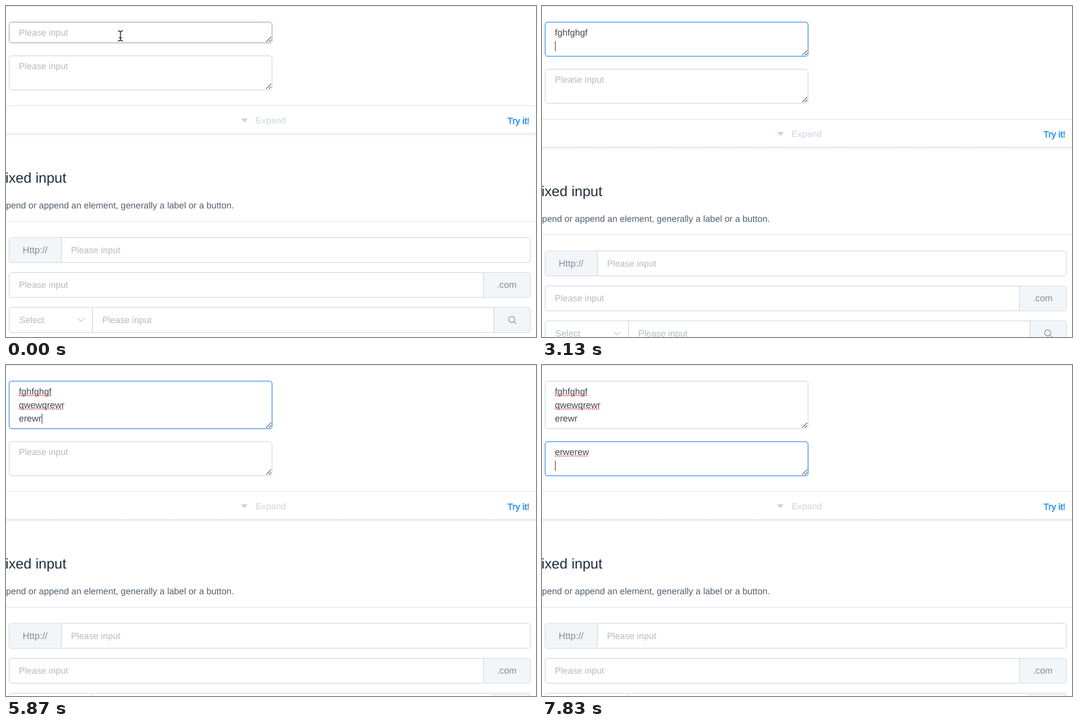
Animation, 947 px wide and 592 px high, one loop 8 s. Source, as an HTML page:

```html
<!DOCTYPE html>
<html lang="en">
<head>
<meta charset="utf-8">
<title>Autosize textarea</title>
<style>
  html, body { margin: 0; width: 100%; height: 100%; overflow: hidden; background: #fff; }
  svg { display: block; }
  text { font: 16px "Liberation Sans", Arial, sans-serif; white-space: pre; text-rendering: geometricPrecision; }
  .hint { fill: #b6bac2; }
  .typed { fill: #45484f; font-size: 16.15px; }
  .addon { fill: #868c94; }
  .field { fill: #fff; stroke: #d2d8e2; stroke-width: 1.25; }
  .fill { fill: #f3f6f8; }
  .rule { stroke: #e3e8f0; stroke-width: 1.25; }
  .thin { fill: none; stroke-width: 1.2; }
  .grip { fill: none; stroke: #4a4c52; stroke-width: 1.1; }
  .spell { stroke: #e5483e; stroke-width: 2.2; stroke-linecap: round; stroke-dasharray: 0 3.5; }
</style>
</head>
<body>
<svg id="stage" width="947" height="592" viewBox="0 0 947 592">
  <defs>
    <linearGradient id="shade" x1="0" y1="0" x2="0" y2="1">
      <stop offset="0" stop-color="#e3eaf4" stop-opacity=".8"/>
      <stop offset="1" stop-color="#eef3fa" stop-opacity="0"/>
    </linearGradient>
    <path id="beam" d="M-4 -9Q0 -9 0 -6V6Q0 9 -4 9M4 -9Q0 -9 0 -6M0 6Q0 9 4 9M-2.2 3.2H2.2"/>
  </defs>
  <path class="rule" d="M0 .5H947"/>

  <g id="below">
    <path class="rule" d="M0 178.4H947"/>
    <rect y="228.5" width="947" height="6" fill="url(#shade)"/>
    <path class="rule" d="M0 228.3H947" style="stroke:#dde3ec"/>
    <path d="M420 201.2H432L426 208.2Z" fill="#c6d3e3"/>
    <text x="446" y="209.7" fill="#cdd6e0">Expand</text>
    <text x="935.3" y="210.7" text-anchor="end" fill="#2f8fee" stroke="#2f8fee" stroke-width=".6">Try it!</text>
    <text x="-1" y="315.6" fill="#1f2f3d" style="font-size:25.4px">ixed input</text>
    <text x="0" y="362" fill="#50606f" style="font-size:16.05px">pend or append an element, generally a label or a button.</text>
    <path class="rule" d="M0 385.4H947"/>

    <g transform="translate(0 414)">
      <rect class="field" x="5.6" y="0" width="931.2" height="44.6" rx="4.5"/>
      <path class="fill" d="M99 .6H10a4 4 0 0 0 -3.8 4V40a4 4 0 0 0 3.8 4H99Z"/>
      <path class="field" d="M99 0V44.6"/>
      <text class="addon" x="52" y="27.9" text-anchor="middle" style="font-size:16.6px">Http://</text>
      <text class="hint" x="116.2" y="27.9">Please input</text>
    </g>
    <g transform="translate(0 476.6)">
      <rect class="field" x="5.6" y="0" width="931.2" height="44.6" rx="4.5"/>
      <path class="fill" d="M853.5 .6H932a4 4 0 0 1 4.2 4V40a4 4 0 0 1 -4.2 4H853.5Z"/>
      <path class="field" d="M853.5 0V44.6"/>
      <text class="hint" x="23" y="27.9">Please input</text>
      <text class="addon" x="877" y="27.9" style="font-size:16.3px">.com</text>
    </g>
    <g transform="translate(0 539.2)">
      <rect class="field" x="5.6" y="0" width="931.2" height="44.6" rx="4.5"/>
      <path class="fill" d="M871.8 .6H932a4 4 0 0 1 4.2 4V40a4 4 0 0 1 -4.2 4H871.8Z"/>
      <path class="field" d="M154.6 0V44.6M871.8 0V44.6"/>
      <text class="hint" x="24" y="27.9">Select</text>
      <path class="thin" stroke="#b9c4d2" d="M128.2 19.4L134.2 25.2L140.2 19.4"/>
      <text class="hint" x="172" y="27.9">Please input</text>
      <g class="thin" stroke="#868c94">
        <circle cx="903.6" cy="21.4" r="5.5"/>
        <path d="M907.6 25.4L911.6 29.4"/>
      </g>
    </g>
  </g>

  <g id="areas"></g>

  <g id="pointer" fill="none" stroke-linecap="round">
    <use href="#beam" stroke="#fff" stroke-width="3.2"/>
    <use href="#beam" stroke="#222" stroke-width="1.5"/>
  </g>
</svg>
<script>
const LOOP = 8000, ROW = 24, TOP = 28.9, GAP = 23.1, PAD = 13, TEXT_X = 23;
const BASE = [210, 216, 226], HOVER = [163, 168, 176], FOCUS = [51, 136, 230];
const ONE = "fghfghgf\nqwewqrewr\nerewr", TWO = "erwerew\n";

// [time, number of characters typed]
const KEYS_ONE = [[970, 0], [1870, 1], [2030, 2], [2130, 3], [2270, 4], [2370, 5], [2470, 6],
  [2630, 7], [2670, 8], [3100, 9], [3770, 10], [4100, 11], [4270, 12], [4330, 13], [4400, 14],
  [4570, 16], [4670, 18], [4970, 19], [5570, 20], [5730, 23], [5870, 24]];
const KEYS_TWO = [[6870, 0], [7070, 1], [7200, 2], [7370, 3], [7430, 4], [7500, 6], [7670, 7], [7770, 8]];

// [time, x, y]
const PATH = [[6270, 204, 50], [6340, 192, 31], [6430, 162, 66], [6530, 127, 125],
  [6630, 111.5, 151.5], [6760, 104, 158], [6870, 102, 160]];

const $ = id => document.getElementById(id);

function set(el, attrs) {
  for (const k in attrs) el.setAttribute(k, attrs[k]);
  return el;
}

function add(parent, tag, attrs) {
  const el = document.createElementNS("http://www.w3.org/2000/svg", tag);
  return parent.appendChild(set(el, attrs));
}

const show = (el, on) => { el.style.display = on ? "" : "none"; };

function makeArea(lineCount) {
  const g = add($("areas"), "g", {});
  const box = add(g, "rect", { class: "field", x: 5.6, width: 469.8, rx: 4.5 });
  const view = add(g, "svg", { x: 0, y: .6, width: 474, overflow: "hidden" });
  const roll = add(view, "g", {});
  const hint = add(roll, "text", { class: "hint", x: TEXT_X, y: 23.3 });
  hint.textContent = "Please input";
  const lines = [], spells = [];
  for (let i = 0; i < lineCount; i++) {
    lines.push(add(roll, "text", { class: "typed", x: TEXT_X, y: 23.3 + i * ROW }));
    spells.push(add(roll, "path", { class: "spell" }));
  }
  const caret = add(roll, "rect", { width: 1.2, height: 18, fill: "#444" });
  const grip = add(g, "path", { class: "grip", d: "M464.8 -1.8L473.8 -10.8M469.8 -1.8L473.8 -5.8" });
  return { g, box, view, roll, hint, lines, spells, caret, grip };
}

function drawArea(a, s) {
  const h = s.rows * ROW + PAD;
  set(a.g, { transform: `translate(0 ${s.y})` });
  set(a.box, { height: h });
  a.box.style.stroke = `rgb(${s.border})`;
  set(a.view, { height: h - 1.2 });
  set(a.grip, { transform: `translate(0 ${h})` });
  show(a.hint, !s.text);

  const parts = s.text.split("\n"), last = parts.length - 1;
  set(a.roll, { transform: `translate(0 ${parts.length > s.rows ? -14.6 : 0})` });
  a.lines.forEach((line, i) => {
    line.textContent = parts[i] || "";
    const marked = i < s.marked;
    show(a.spells[i], marked);
    if (marked) {
      const end = TEXT_X + line.getComputedTextLength() - .5;
      set(a.spells[i], { d: `M${TEXT_X + 1} ${25.2 + i * ROW}H${end}` });
    }
  });
  show(a.caret, s.caret);
  const used = parts[last] ? a.lines[last].getComputedTextLength() : 0;
  set(a.caret, { x: TEXT_X + .3 + used, y: 9.5 + last * ROW });
}

const lastStep = (steps, t) => steps.filter(k => k[0] <= t).pop();

function typing(keys, full, t) {
  const key = lastStep(keys, t);
  if (!key) return { text: "", caret: false };
  return { text: full.slice(0, key[1]), caret: (t - key[0]) % 1000 < 500 };
}

function fade(from, to, start, t) {
  const p = Math.min(1, Math.max(0, (t - start) / 200));
  const e = p * p * (3 - 2 * p);
  return from.map((c, i) => Math.round(c + (to[i] - c) * e));
}

function pointerAt(t) {
  if (t < 1870) return [204.5, 53.5];
  if (t < PATH[0][0] || t >= 7070) return null;
  const i = PATH.findIndex(p => p[0] > t);
  if (i < 0) return PATH[PATH.length - 1].slice(1);
  const a = PATH[i - 1], b = PATH[i], p = (t - a[0]) / (b[0] - a[0]);
  return [a[1] + (b[1] - a[1]) * p, a[2] + (b[2] - a[2]) * p];
}

const first = makeArea(3), second = makeArea(2);

function draw(t) {
  const rows = t < 3130 ? 1 : t < 5030 ? 2 : 3;
  const one = typing(KEYS_ONE, ONE, t), two = typing(KEYS_TWO, TWO, t);
  drawArea(first, {
    y: TOP, rows, text: one.text, caret: one.caret && t < 6870,
    marked: t < 3830 ? 0 : t < 5730 ? 1 : 2,
    border: t < 6870 ? fade(HOVER, FOCUS, 970, t) : fade(FOCUS, BASE, 6870, t)
  });
  drawArea(second, {
    y: TOP + rows * ROW + PAD + GAP, rows: 2, text: two.text, caret: two.caret,
    marked: t < 7830 ? 0 : 1,
    border: t < 6870 ? fade(BASE, HOVER, 6570, t) : fade(HOVER, FOCUS, 6870, t)
  });
  set($("below"), { transform: `translate(0 ${(rows - 1) * ROW})` });

  const at = pointerAt(t);
  show($("pointer"), at);
  if (at) set($("pointer"), { transform: `translate(${at})` });
}

const began = performance.now();
function tick() {
  draw((performance.now() - began) % LOOP);
  requestAnimationFrame(tick);
}
tick();
</script>
</body>
</html>
```
